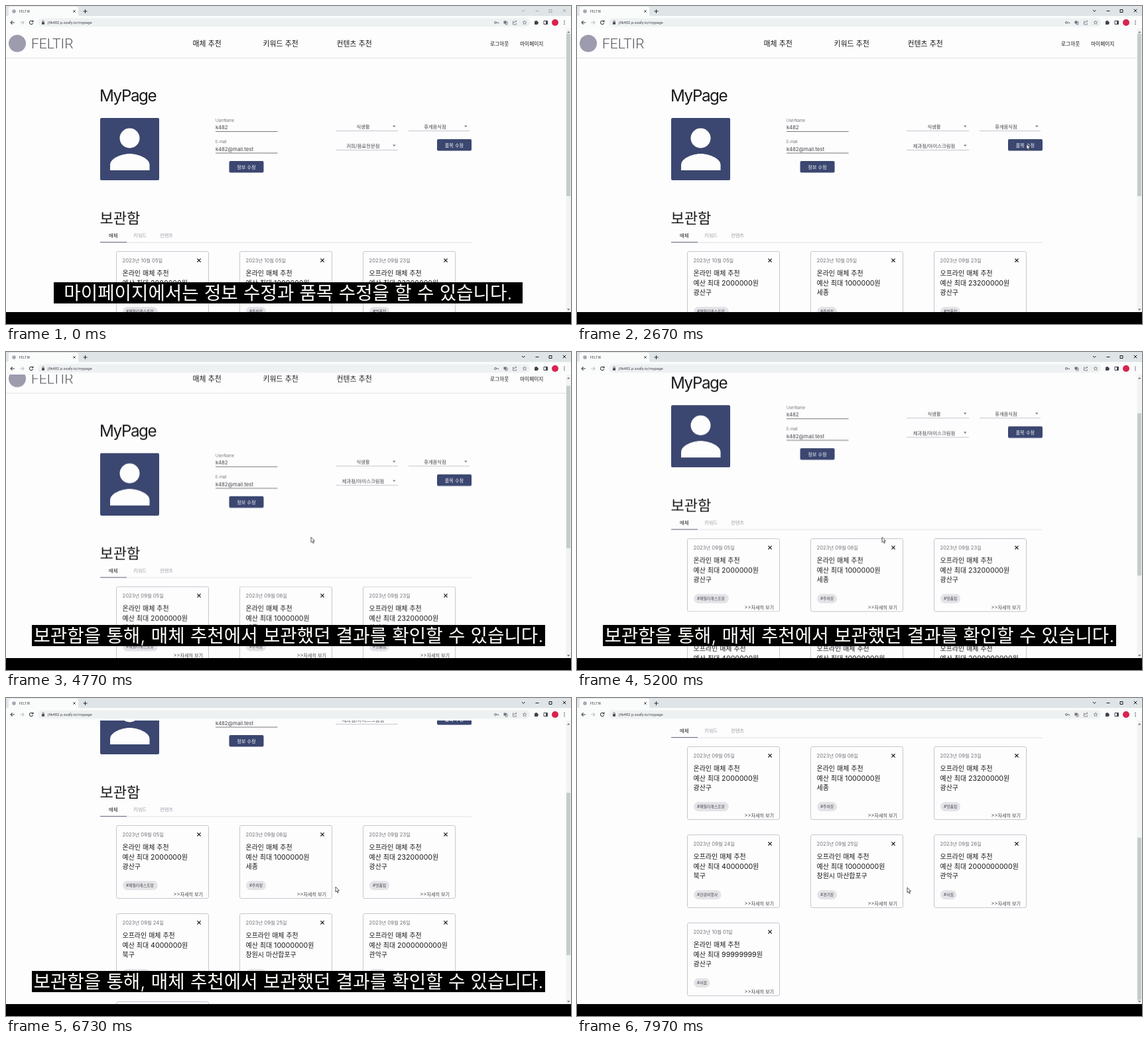
Animation, 852 px wide and 480 px high, one loop 8 s. Source, as an HTML page:

```html
<!DOCTYPE html>
<html lang="ko">
<head>
<meta charset="utf-8">
<title>MyPage</title>
<style>
  html, body { margin: 0; width: 100%; height: 100%; overflow: hidden; background: #000; }
  svg { display: block; width: 852px; height: 480px; }
  text { font-family: Inter, "Noto Sans CJK KR", "Noto Sans CJK", sans-serif; white-space: pre; }
  tspan { font-size: .94em; }
</style>
</head>
<body>
<svg id="stage" viewBox="0 0 852 480" xmlns="http://www.w3.org/2000/svg"></svg>
<script>
const LOOP = 8000;
const INK = '#18181c', SOFT = '#44444c', GREY = '#73737c', MUTED = '#9c9ca8';
const RULE = '#c6c6d2', PALE = '#e0e0e6', PAPER = '#fdfdfd', NAVY = '#3b4770';

// Hangul runs are set slightly smaller than the Latin next to them.
const text = (x, y, size, str, { fill = INK, anchor = 'start', weight = 400, more = '' } = {}) =>
  `<text x="${x}" y="${y}" font-size="${size}" fill="${fill}" text-anchor="${anchor}" font-weight="${weight}" ${more}>` +
  str.replace(/[가-힣]+/g, '<tspan>$&</tspan>') + '</text>';
const rect = (x, y, w, h, fill, more = '') =>
  `<rect x="${x}" y="${y}" width="${w}" height="${h}" fill="${fill}" ${more}/>`;
const circle = (x, y, r, fill, more = '') => `<circle cx="${x}" cy="${y}" r="${r}" fill="${fill}" ${more}/>`;
const line = (d, stroke = INK, width = 1, more = '') =>
  `<path d="${d}" fill="none" stroke="${stroke}" stroke-width="${width}" ${more}/>`;
const cross = (x, y, r, width, color = INK) =>
  line(`M${x - r} ${y - r}l${2 * r} ${2 * r}m0 ${-2 * r}l${-2 * r} ${2 * r}`, color, width);
const group = (id, body) => `<g id="${id}">${body}</g>`;

const button = (x, y, label) =>
  rect(x, y, 52, 17.5, NAVY, 'rx="2"') +
  text(x + 26, y + 11.6, 7.6, label, { fill: PAPER, anchor: 'middle' });

const field = (y, label, value) =>
  text(316, y, 5.6, label, { fill: GREY }) +
  text(316, y + 11.5, 7.8, value, { fill: SOFT }) +
  line(`M316 ${y + 15}h93.500`, '#77777f');

const select = (x, y, w, labels) =>
  labels + line(`M${x} ${y + 7}h${w}`, RULE) +
  `<path d="M${x + w - 8} ${y - 1}h4.600l-2.300 2.500z" fill="${GREY}"/>`;
const choice = (x, y, str, more = '') =>
  text(x, y + 3, 7.8, str, { fill: SOFT, anchor: 'middle', more });

function card([date, kind, budget, place, tag, oldDate], i) {
  const x = 166 + (i % 3) * 186, y = 370 + Math.floor(i / 3) * 133;
  const day = (d, cls) => text(x + 9.5, y + 16.5, 7.7, `2023년 ${d}`, { fill: GREY, more: `class="${cls}"` });
  return rect(x + .5, y + .5, 139, 110, PAPER, `rx="2.500" stroke="${RULE}"`) +
    (oldDate ? day(oldDate, 'before') + day(date, 'after') : day(date, '')) +
    cross(x + 125, y + 14, 2.6, 1.3) +
    [kind + ' 매체 추천', `예산 최대 ${budget}원`, place]
      .map((row, n) => text(x + 9.5, y + 37 + n * 14.7, 10.6, row)).join('') +
    rect(x + 10, y + 84, 13 + 5.7 * tag.length, 14, '#e4e4e8', 'rx="7"') +
    text(x + 15, y + 93.2, 6.3, '#' + tag, { fill: SOFT }) +
    text(x + 131, y + 106.6, 7.5, '>>자세히 보기', { fill: SOFT, anchor: 'end' });
}

const cards = [
  ['09월 05일', '온라인', '2000000', '광산구', '패밀리레스토랑', '10월 05일'],
  ['09월 06일', '온라인', '1000000', '세종', '주차장', '10월 05일'],
  ['09월 23일', '오프라인', '23200000', '광산구', '명품점'],
  ['09월 24일', '오프라인', '4000000', '북구', '관광여행사'],
  ['09월 25일', '오프라인', '10000000', '창원시 마산합포구', '경기장'],
  ['09월 26일', '오프라인', '2000000000', '관악구', '서점'],
  ['10월 01일', '온라인', '99999999', '광산구', '서점'],
];

const header =
  circle(17, 56.5, 13, '#9c9cae') +
  text(38, 63.5, 21, 'FELTIR', { fill: '#55555f', weight: 300, more: 'style="font-family:Roboto,sans-serif"' }) +
  [[281.5, '매체 추천'], [387.5, '키워드 추천'], [498.5, '컨텐츠 추천']]
    .map(([x, s]) => text(x, 61, 11.6, s, { weight: 500 })).join('') +
  text(730, 59.5, 8.2, '로그아웃') + text(775, 59.5, 8.2, '마이페이지') +
  line('M0 78.500H845', PALE);

const profile =
  text(141, 144, 24.2, 'MyPage', { more: 'letter-spacing="-1.4"' }) +
  rect(142, 169, 89, 94, NAVY, 'rx="2"') +
  circle(186.5, 199.5, 15, PAPER) +
  `<path d="M157 248v-8c0-11 19-17 29.500-17s30 6 30 17v8z" fill="${PAPER}"/>` +
  field(174.5, 'UserName', 'k482') + field(207, 'E-mail', 'k482@mail.test') +
  button(336.500, 234, '정보 수정') + button(650, 201, '품목 수정') +
  select(497, 181.5, 94, choice(538.5, 182, '식생활')) +
  select(607, 181.5, 92, choice(647, 182, '휴게음식점')) +
  select(497, 210.5, 94,
    choice(538.5, 210.5, '커피/음료전문점', 'id="oldPick"') +
    choice(538.5, 210.5, '제과점/아이스크림점', 'id="newPick"'));

const locker =
  text(141.5, 327.5, 23.5, '보관함') +
  text(155, 349, 7.7, '매체') +
  text(192, 349, 7.7, '키워드', { fill: MUTED }) + text(232, 349, 7.7, '컨텐츠', { fill: MUTED }) +
  line('M142 357H702', PALE) + line('M142 356.500h40', '#6c6c80') +
  cards.map(card).join('');

const menu =
  rect(498, 220, 93, 70, '#a8a8ac', 'rx="2" filter="url(#soft)"') +
  rect(498, 219, 93, 69, PAPER, 'rx="2"') + rect(498, 252, 93, 15.3, '#e2e6ee') +
  ['휴게음식점', '제과점/아이스크림점', '커피/음료전문점', '패스트푸드점']
    .map((s, i) => text(505, 231.8 + i * 15.4, 7.6, s)).join('');

const browser =
  rect(0, 0, 852, 15, '#dfe5e7') + rect(0, 15, 852, 19, '#fafbfb') +
  `<path d="M2 15q2 0 2-2V4q0-3 3-3h99q3 0 3 3v9q0 2 2 2z" fill="#fafbfb"/>` +
  circle(12, 8, 2.8, '#a6a6b4') + text(19.5, 10, 5.2, 'FELTIR', { fill: SOFT }) +
  cross(103, 8, 1.7, .8) + line('M116.500 8h6m-3-3v6', INK, .9) +
  group('controls', line('M778 6l2.300 2.300l2.300-2.300M798.500 7.500h5M819 5.500h4v4h-4z') + cross(842, 7, 2.3, 1)) +
  rect(48, 18.5, 742, 12.5, '#eef1f2', 'rx="6.200"') +
  line('M13 25H7m2.600-2.700L7 25l2.600 2.700', SOFT, 1.1) +
  line('M21 25h6m-2.600-2.700L27 25l-2.600 2.700', '#c0c0c6', 1.1) +
  line('M40.300 23.300A2.700 2.700 0 1 0 40.700 25.700M41 21.500v2.200h-2.300', SOFT, 1.1) +
  rect(54, 24.3, 4, 3.4, SOFT) + line('M54.800 24.500v-1.300a1.200 1.200 0 0 1 2.400 0v1.300', SOFT, .7) +
  text(63, 27, 5.8, 'j9k482.p.ssafy.io/mypage', { fill: SOFT, more: 'style="font-family:Roboto,sans-serif"' }) +
  line('M739.500 25h3v1.500', GREY) + circle(738, 25, 1.5, 'none', `stroke="${GREY}"`) +
  rect(750.5, 22.5, 4, 4, GREY) + line('M753 24h3v4h-3z', GREY, .8) +
  line('M766 23h-1.500v5h5v-2M766 26q0-3 4-3m-1.500-1.500l1.500 1.500l-1.500 1.500', GREY, .8) +
  line('M782 22l.9 2h2.100l-1.700 1.400l.6 2.200l-1.900-1.200l-1.900 1.200l.6-2.200l-1.700-1.400h2.100z', GREY, .7) +
  rect(797, 23, 5, 5, SOFT) + circle(799.5, 22.8, 1.1, SOFT) + circle(802, 25.4, 1.1, SOFT) +
  line('M811 22.500h5.500v5H811z', SOFT) + rect(814, 22.5, 2.5, 5, SOFT) +
  circle(828, 25, 5, '#d8244f') +
  [22.5, 25, 27.5].map(y => circle(842, y, .75, SOFT)).join('');

const scrollbar =
  rect(844.5, 34, 7.5, 428, '#f1f4f2') +
  `<path d="M846 40.500h4.500l-2.250-2.500zM846 457h4.500l-2.250 2.500z" fill="${GREY}"/>` +
  rect(845, 42, 6, 245, '#c3cec8', 'id="thumb"');

const caption = (id, x, y, w, h, str) =>
  group(id, rect(x, y, w, h, '#000') +
    text(x + w / 2, y + 26.2, 29.4, str, { fill: '#fffffa', anchor: 'middle', weight: 300 }));

const stage = document.getElementById('stage');
stage.innerHTML =
  `<defs><clipPath id="view"><rect y="34" width="852" height="428"/></clipPath>
   <filter id="soft" x="-20%" y="-20%" width="140%" height="140%"><feGaussianBlur stdDeviation="2"/></filter></defs>` +
  rect(0, 0, 852, 462, PAPER) +
  `<g clip-path="url(#view)">${group('page', header + profile + locker)}</g>` +
  group('bar', scrollbar) + browser + group('menu', menu) +
  group('cursor', `<path d="M0 0v7.800l1.800-1.600l1.300 3l1.300-.6l-1.300-2.900h2.400z" fill="${PAPER}" stroke="#2c2c30" stroke-width=".8"/>`) +
  rect(0, 462, 852, 18, '#000') +
  caption('captionEdit', 72, 417, 707, 32, '마이페이지에서는 정보 수정과 품목 수정을 할 수 있습니다.') +
  caption('captionLocker', 39, 412, 774, 32, '보관함을 통해, 매체 추천에서 보관했던 결과를 확인할 수 있습니다.');

// steps: [time, value]; hard steps hold each value until the next time.
function play(selector, property, steps, easing = 'linear') {
  const frames = steps.map(([t, v]) => ({ offset: t / LOOP, [property]: v, easing }));
  frames.push({ ...frames[frames.length - 1], offset: 1 });
  for (const el of stage.querySelectorAll(selector))
    el.animate(frames, { duration: LOOP, iterations: Infinity });
}
const switchAt = (selector, ...steps) => play(selector, 'opacity', steps, 'step-end');
const move = (x, y) => `translate(${x}px, ${y}px)`;

const scroll = [
  [0, 0], [4690, 0], [4770, 16], [4860, 44.4], [5000, 44.4], [5150, 88.8], [5270, 88.8],
  [5420, 133], [5520, 133], [5570, 149], [5670, 178], [7150, 178], [7310, 222],
  [7450, 222], [7600, 266.5], [7700, 266.5], [7840, 297],
];
play('#page', 'transform', scroll.map(([t, y]) => [t, move(0, -y)]));
play('#thumb', 'transform', scroll.map(([t, y]) => [t, move(0, y * .568)]));

const path = [
  [0, 600, 250], [500, 600, 250], [950, 581, 208], [1300, 581, 208], [1700, 545, 242],
  [1900, 545, 242], [2450, 678, 208.5], [3370, 678, 208.5], [4100, 460, 279.5],
  [5870, 460, 279.5], [6500, 497, 285], [6730, 497, 285], [7100, 498, 286],
];
play('#cursor', 'transform', path.map(([t, x, y]) => [t, move(x, y)]), 'ease-in-out');
switchAt('#cursor', [0, 0], [400, 1]);

play('#menu', 'opacity', [[0, 0], [1110, 0], [1350, 1], [1880, 1], [2050, 0]]);
switchAt('#bar', [0, 1], [1110, 0], [2050, 1]);
switchAt('#oldPick', [0, 1], [1880, 0]);
switchAt('#newPick', [0, 0], [1880, 1]);
switchAt('#controls', [0, .3], [100, 1]);
switchAt('.before', [0, 1], [4450, 0]);
switchAt('.after', [0, 0], [4450, 1]);
switchAt('#captionEdit', [0, 1], [2400, 0]);
switchAt('#captionLocker', [0, 0], [4450, 1], [7500, 0]);
</script>
</body>
</html>
```
